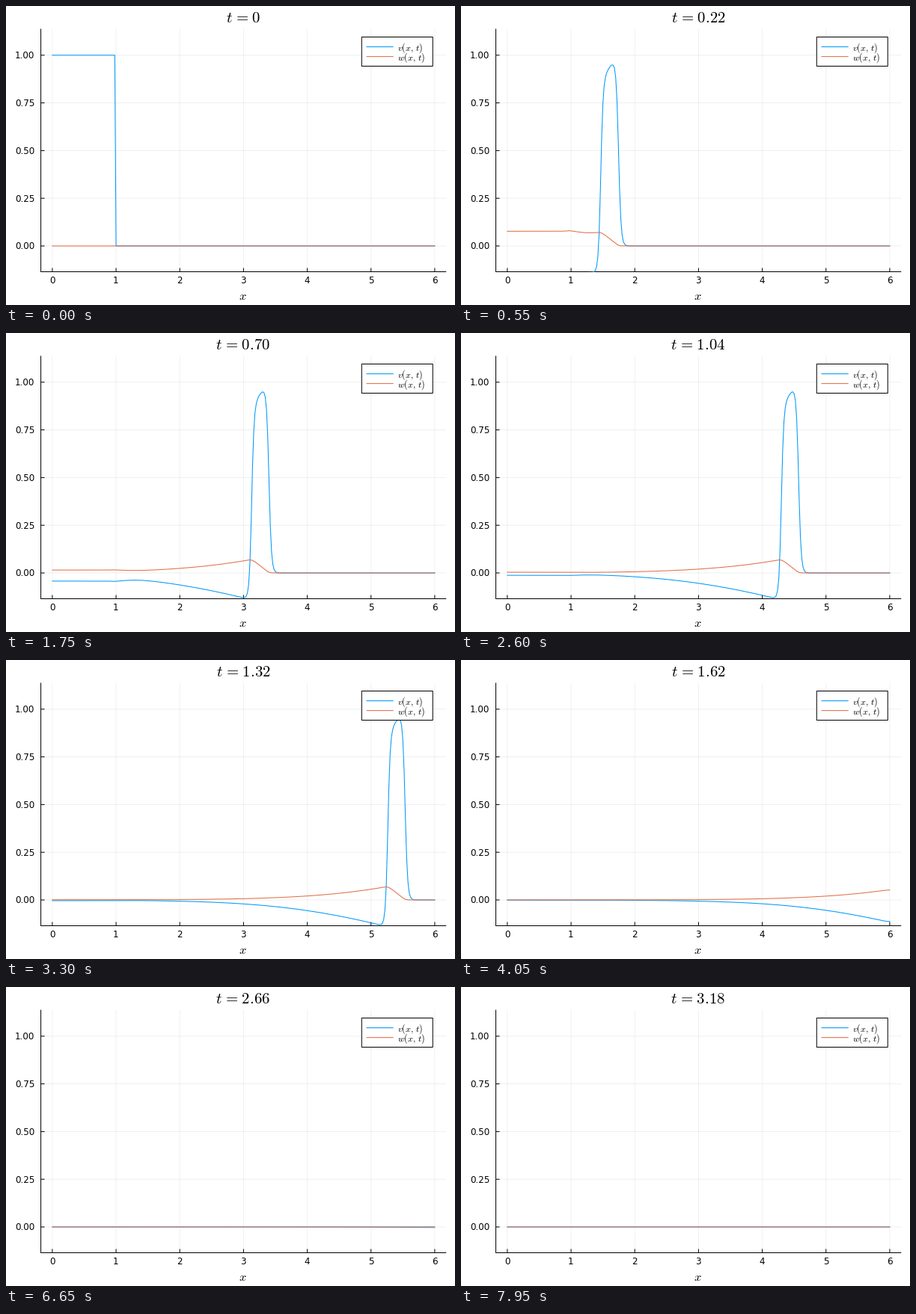
A matplotlib script that plays this animation: 600x400 px, repeating every 8000 ms.

```python
import numpy as np
import matplotlib.pyplot as plt
from matplotlib.animation import FuncAnimation
from matplotlib.patches import Rectangle

W, H, DPI = 600, 400, 100
FRAMES, STEP_MS, DT = 160, 50, 0.02
BLUE, ORANGE = "#009AFA", "#E36F47"

# FitzHugh-Nagumo pulse: v_t = D v_xx + (v(1-v)(v-A) - w)/EPS, w_t = v - w
D, EPS, A = 0.194, 0.001, 0.3
N, SUB = 301, 60
x = np.linspace(0, 6, N)
dx = x[1] - x[0]


def pt(px):
    return px * 72 / DPI


def rate(u):
    v, w = u
    p = np.concatenate((v[1:2], v, v[-2:-1]))
    lap = (p[2:] - 2 * v + p[:-2]) / dx**2
    return np.array([D * lap + (v * (1 - v) * (v - A) - w) / EPS, v - w])


def solve():
    u = np.array([np.where(x < 1 - dx / 2, 1.0, 0.0), np.zeros(N)])
    h = DT / SUB
    states = [u]
    for _ in range(FRAMES - 1):
        for _ in range(SUB):
            a = rate(u)
            b = rate(u + h / 2 * a)
            c = rate(u + h / 2 * b)
            d = rate(u + h * c)
            u = u + h / 6 * (a + 2 * b + 2 * c + d)
        states.append(u)
    return states


states = solve()

plt.rcParams["font.family"] = "DejaVu Sans"
plt.rcParams["mathtext.fontset"] = "cm"

# The whole stage is one axes in pixels, y pointing down.
fig = plt.figure(figsize=(W / DPI, H / DPI), dpi=DPI, facecolor="white")
ax = fig.add_axes([0, 0, 1, 1])
ax.set_xlim(0, W)
ax.set_ylim(H, 0)
ax.axis("off")


def px(val):
    return 61.9 + 85.17 * val


def py(val):
    return 321.0 - 255.2 * val


LEFT, RIGHT, TOP, BOTTOM = px(-0.18), px(6.18), 30.5, 355.5


def seg(x0, y0, x1, y1, color="black", lw=1.0, **kw):
    ax.plot([x0, x1], [y0, y1], color=color, lw=pt(lw), snap=False,
            solid_capstyle="butt", **kw)


def label(s, tx, ty, size, **kw):
    return ax.text(tx, ty, s, fontsize=pt(size), color="black", **kw)


for i in range(7):
    gx = px(i)
    seg(gx, TOP, gx, BOTTOM, alpha=0.06, zorder=1)
    seg(gx, BOTTOM, gx, BOTTOM - 5, zorder=2)
    label(str(i), gx - 0.3, 371.3, 11.9, ha="center")
for i in range(5):
    gy = py(i / 4)
    seg(LEFT, gy, RIGHT, gy, alpha=0.06, zorder=1)
    seg(LEFT, gy, LEFT + 5, gy, zorder=2)
    label(f"{i / 4:.2f}", 38.5, gy + 4.3, 11.9, ha="right")
seg(LEFT, TOP, LEFT, BOTTOM + 0.5, zorder=2)
seg(LEFT - 0.5, BOTTOM, RIGHT, BOTTOM, zorder=2)

clip = Rectangle((LEFT, TOP), RIGHT - LEFT, BOTTOM - TOP, transform=ax.transData)
curves = []
for color in (BLUE, ORANGE):
    line, = ax.plot([], [], color=color, lw=pt(1.05), zorder=3, snap=False)
    line.set_clip_path(clip)
    curves.append(line)

ax.add_patch(Rectangle((475.3, 41.5), 95, 39, fc="white", ec="black",
                       lw=pt(1), snap=False, zorder=4))
for name, color, ly in (("v", BLUE, 54.6), ("w", ORANGE, 67.6)):
    seg(481.5, ly, 517.7, ly, color, 1.05, zorder=5)
    label(rf"${name}(x,\,t)$", 522.6, ly + 4.7, 12, zorder=5)

label("$x$", 316.6, 392.8, 16.5, ha="center")
title = label("", 317, 21.5, 20.8, ha="center")


def update(i):
    for line, vals in zip(curves, states[i]):
        line.set_data(px(x), py(vals))
    time = f"{i * DT:.2f}" if i else "0"
    title.set_text(rf"$t\hspace{{0.11}}=\hspace{{0.11}}{time}$")
    return (*curves, title)


anim = FuncAnimation(fig, update, frames=FRAMES, interval=STEP_MS,
                     repeat=True, repeat_delay=0, blit=False)
plt.show()
```
